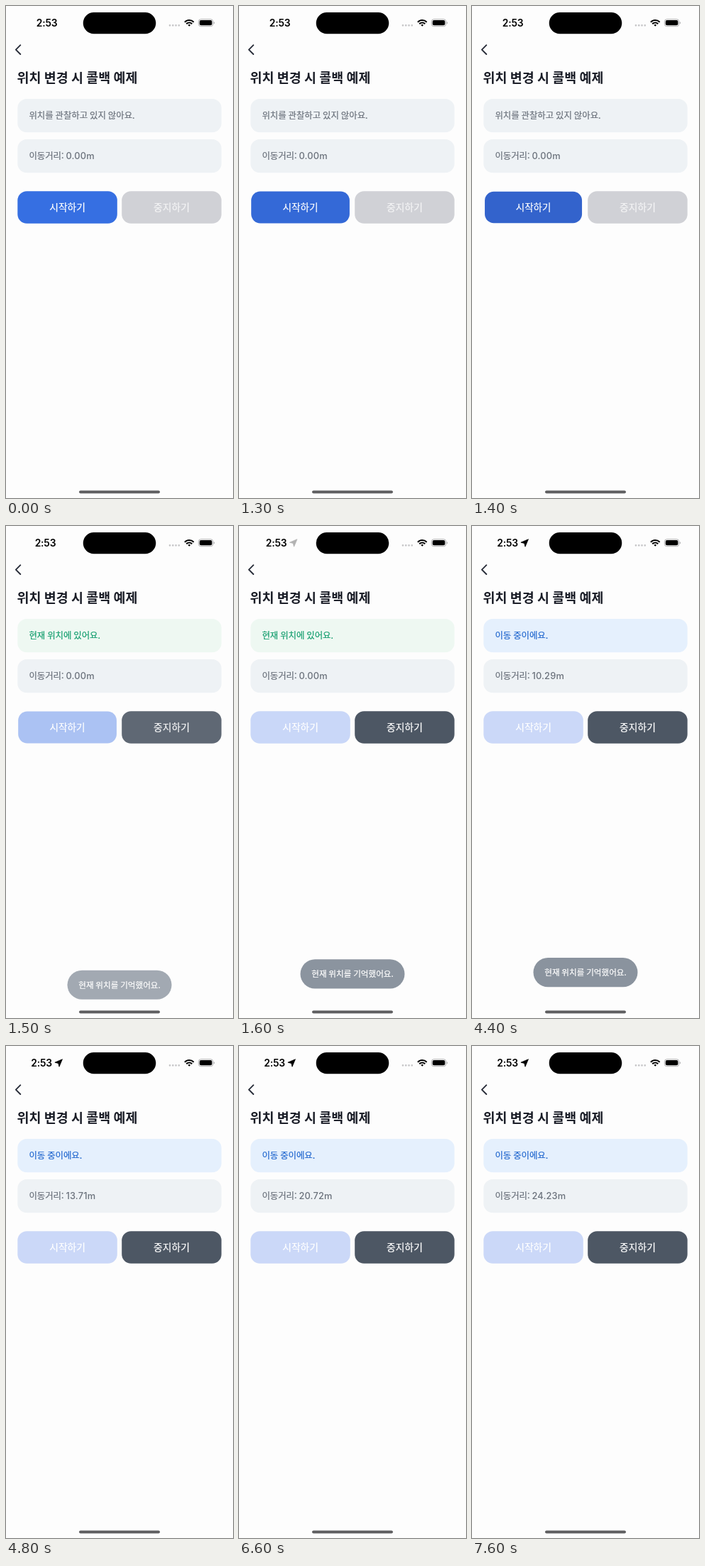
These frames come from a looping animation (320x694 px, 8000 ms). An HTML page:

```html
<!DOCTYPE html>
<html lang="ko">
<head>
<meta charset="utf-8">
<style>
  html, body { margin: 0; width: 100%; height: 100%; overflow: hidden; background: #fdfdfd; }
  svg { display: block; width: 100%; height: 100%; }
  text { font-family: "Noto Sans CJK KR", "Noto Sans CJK", "Noto Sans CJK JP", sans-serif; font-size: 12.4px; word-spacing: -.042em; }
  .latin { font-family: Inter, sans-serif; font-size: 12.8px; font-weight: 500; letter-spacing: .2px; }
  .clock { font-size: 13.84px; font-weight: 600; letter-spacing: -.15px; }
  .medium { stroke-width: .22px; }
  .button { font-size: 13.8px; text-anchor: middle; fill: #fff; stroke: #fff; }
</style>
</head>
<body>
<svg viewBox="0 0 320 694">
  <!-- status bar -->
  <g id="clock">
    <text class="latin clock" x="42.7" y="28.9">2:53</text>
    <path id="arrow" d="M86.8 18.7 82.4 29.2 81.2 24.4 76.3 23.2Z" stroke="#000" stroke-width=".8" stroke-linejoin="round"/>
  </g>
  <rect x="108.7" y="9" width="102.6" height="30.2" rx="15.1"/>
  <path d="M231 27.3h13" stroke="#c5c5c7" stroke-width="2.7" stroke-linecap="round" stroke-dasharray="0 4.27"/>
  <g fill="none" stroke="#000" stroke-width="2">
    <path d="M251.9 22.7a9.1 9.1 0 0 1 12.8 0M254.3 25.2a5.7 5.7 0 0 1 8 0"/>
    <path d="M256.4 26.8a2.8 2.8 0 0 1 3.8 0L258.3 28.8Z" fill="#000" stroke="none"/>
  </g>
  <rect x="271.4" y="18.7" width="20.4" height="10" rx="3.2" fill="none" stroke="#a5a5a7" stroke-width=".9"/>
  <rect x="272.8" y="20.1" width="17.6" height="7.2" rx="2"/>
  <path d="M292.9 22v3.4q1.1-.5 1.1-1.7t-1.1-1.7" fill="#a5a5a7"/>

  <path d="M20.3 55.2 13.9 61.6 20.3 68" fill="none" stroke="#272c38" stroke-width="1.9" stroke-linecap="round" stroke-linejoin="round"/>
  <text x="15.6" y="108" fill="#191c26" style="font-size:18.4px;font-weight:700">위치 변경 시 콜백 예제</text>

  <rect id="statusBox" x="16.3" y="131" width="287.4" height="47.2" rx="13"/>
  <text id="status" class="medium" x="32.4" y="159"></text>
  <rect x="16.3" y="188" width="287.4" height="47.2" rx="13" fill="#eef2f5"/>
  <text class="medium" x="32.4" y="216.2" fill="#6b727c" stroke="#6b727c">이동거리:</text>
  <text id="distance" class="latin" x="84.4" y="216.2" fill="#6b727c"></text>

  <g id="start">
    <rect id="startBox" x="16.3" y="261.3" width="140.5" height="45.4" rx="13"/>
    <text class="button medium" x="86.6" y="289.2">시작하기</text>
  </g>
  <rect id="stopBox" x="163.2" y="261.3" width="140.5" height="45.4" rx="13"/>
  <text id="stopLabel" class="button medium" x="233.5" y="289.2">중지하기</text>

  <g id="toast">
    <rect x="86.5" y="609" width="147" height="41.2" rx="20.6" fill="#8a939e"/>
    <text class="button medium" x="160" y="634" style="font-size:11.6px">현재 위치를 기억했어요.</text>
  </g>
  <rect x="103" y="683.4" width="114" height="4" rx="2" fill="#5e5e60"/>
</svg>
<script>
const LOOP = 8000, PRESS = 1300, STARTED = 1450, MOVING = 3600, TOAST_OUT = 4400;
const BLUE = [54, 111, 226], BLUE_PRESSED = [51, 99, 204], BLUE_OFF = [203, 216, 248];
const GREY_OFF = [208, 209, 214], SLATE = [77, 87, 100];
const STATES = [
  { from: 0, text: '위치를 관찰하고 있지 않아요.', box: '#eef2f5', ink: '#6b727c' },
  { from: STARTED, text: '현재 위치에 있어요.', box: '#eef8f2', ink: '#179f70' },
  { from: MOVING, text: '이동 중이에요.', box: '#e5f0fd', ink: '#2469cf' },
];
const DISTANCES = [[0, 0], [2500, 6.87], [3600, 10.29], [4600, 13.71], [5600, 17.21], [6600, 20.72], [7600, 24.23]];

const $ = id => document.getElementById(id);
const clamp = v => Math.min(1, Math.max(0, v));
const approach = (elapsed, tau) => elapsed <= 0 ? 0 : 1 - Math.exp(-elapsed / tau);
const mix = (a, b, p) => `rgb(${a.map((v, i) => Math.round(v + (b[i] - v) * p))})`;
const set = (id, attributes) => {
  for (const name in attributes) $(id).setAttribute(name, attributes[name]);
};

function draw(t) {
  const state = STATES.findLast(s => t >= s.from);
  set('statusBox', { fill: state.box });
  set('status', { fill: state.ink, stroke: state.ink });
  $('status').textContent = state.text;
  $('distance').textContent = DISTANCES.findLast(d => t >= d[0])[1].toFixed(2) + 'm';

  // The start button sinks when pressed, then both buttons swap emphasis.
  const press = t < PRESS ? 0 : clamp(.5 + (t - PRESS) / 200) * clamp((1600 - t) / 200);
  const swap = approach(t - STARTED, 33);
  set('start', { transform: `translate(86.5 284) scale(${1 - .025 * press}) translate(-86.5 -284)` });
  set('startBox', { fill: swap ? mix(BLUE, BLUE_OFF, swap) : mix(BLUE, BLUE_PRESSED, press) });
  set('stopBox', { fill: mix(GREY_OFF, SLATE, approach(t - STARTED, 26)) });
  set('stopLabel', { opacity: .75 + .25 * swap });

  const shift = 1 - (1 - clamp((t - STARTED) / 500)) ** 3;
  set('clock', { transform: `translate(${-7.4 * shift} 0)` });
  set('arrow', { opacity: clamp((t - 1520) / 280) });

  const leave = clamp((t - TOAST_OUT) / 400);
  const offset = 50 * (1 - approach(t - STARTED, 49)) + 90 * leave ** 2;
  set('toast', { transform: `translate(0 ${offset})`, opacity: swap * (1 - leave) });
}

function frame() {
  draw(performance.now() % LOOP);
  requestAnimationFrame(frame);
}
frame();
</script>
</body>
</html>
```
